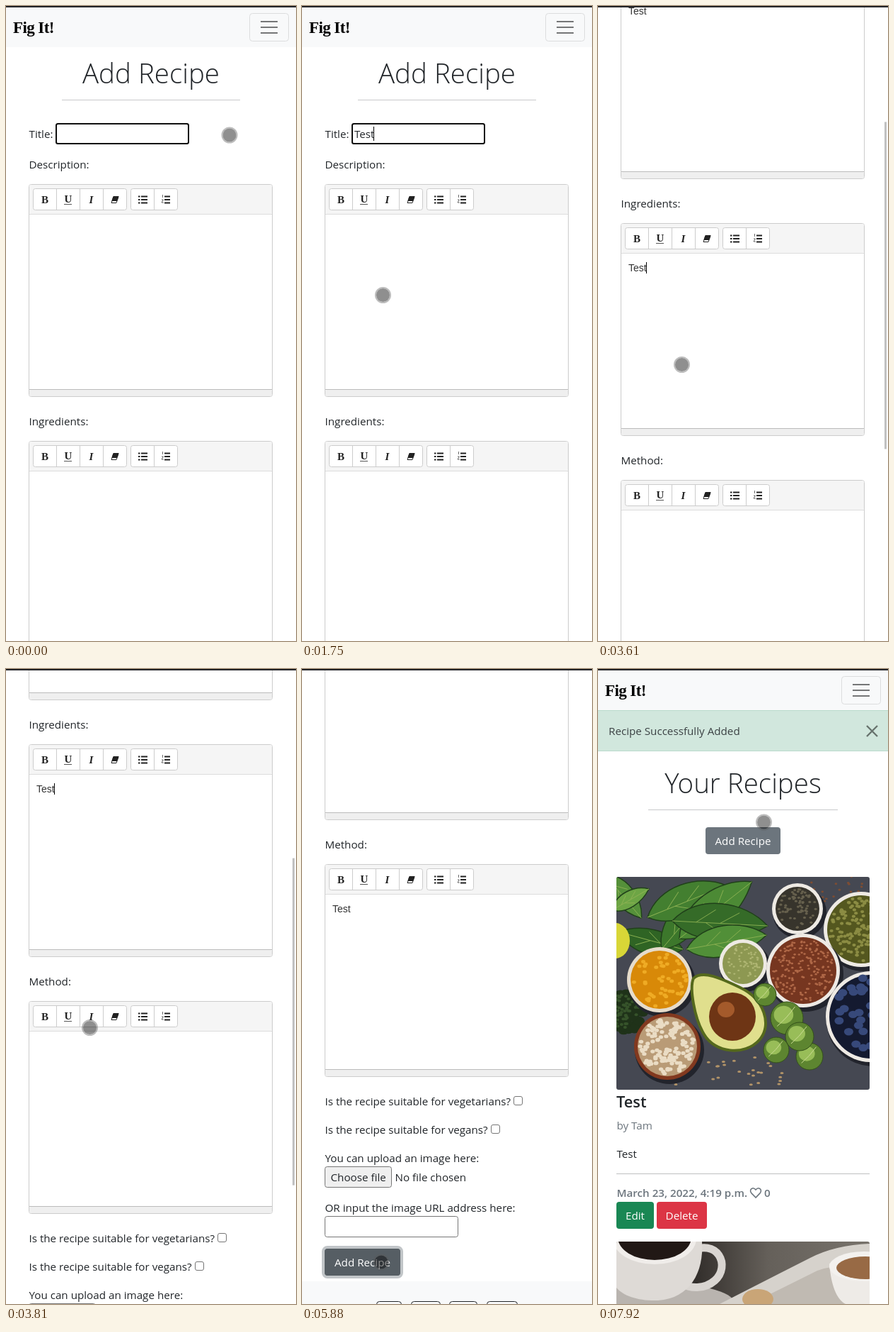
An HTML page for the animation above (7990 ms loop, 410x895 px).

```html
<!DOCTYPE html>
<html lang="en">
<head>
<meta charset="utf-8">
<title>Add Recipe</title>
<style>
html, body { margin: 0; height: 100%; overflow: hidden; background: #fff; }
svg { display: block; width: 100vw; height: 100vh; }
text { font: 15.2px "Open Sans", "Noto Sans", sans-serif; fill: #212529; }
.brand { font: bold 23px "Liberation Serif", serif; letter-spacing: -.6px; fill: #000; }
.h1 { font-size: 38.5px; font-weight: 300; text-anchor: middle; }
.h4 { font-size: 21.8px; font-weight: 600; }
.btn { text-anchor: middle; fill: #fff; }
.ed { font: 14px "Liberation Sans", Arial, sans-serif; fill: #333; }
.tool { font: bold 15px "Liberation Serif", serif; text-anchor: middle; fill: #222; }
.italic { font-style: italic; }
.muted { fill: #6c757d; }
.date { fill: #6c757d; font-weight: 600; }
</style>
</head>
<body>
<svg id="stage" viewBox="0 0 410 895" preserveAspectRatio="none"></svg>
<script>
const LOOP = 7990;
let seed = 7;
const rnd = () => (seed = seed * 16807 % 2147483647) / 2147483647;

const text = (x, y, s, cls = '') => `<text x="${x}" y="${y}" class="${cls}">${s}</text>`;
const rect = (x, y, w, h, fill, more = '') =>
  `<rect x="${x}" y="${y}" width="${w}" height="${h}" fill="${fill}" ${more}/>`;
const box = (x, y, w, h, stroke, fill = '#fff', r = 3) =>
  rect(x + .5, y + .5, w - 1, h - 1, fill, `rx="${r}" stroke="${stroke}"`);
const path = (d, stroke, w = 1, fill = 'none') =>
  `<path d="${d}" stroke="${stroke}" stroke-width="${w}" fill="${fill}"/>`;
const oval = (x, y, rx, ry, fill, more = '') =>
  `<ellipse cx="${x}" cy="${y}" rx="${rx}" ry="${ry}" fill="${fill}" ${more}/>`;

const navbar = () => rect(0, 0, 410, 58, '#f8f9fa') + text(10, 38, 'Fig It!', 'brand') +
  box(344, 10, 56, 40, '#dcddde', 'none', 4) + path('M360 22h24M360 30h24M360 38h24', '#757677', 2);

function editor(y) {
  const tools = box(38, 6, 133, 31, '#ccc') + box(176, 6, 67, 31, '#ccc') +
    path('M71.5 6v31M104.5 6v31M137.5 6v31M209.5 6v31', '#ccc') +
    text(55, 27, 'B', 'tool') + text(88, 26, 'U', 'tool') + path('M82 28.5h11', '#555') +
    text(120.5, 27, 'I', 'tool italic') +
    path('M149 26.5L152 17.5H159L156 26.5Z', '#222', 1) + path('M150 23.5L152 17.5H159L157 23.5Z', '#222', 1, '#222') +
    path('M187 17.5h2.5M187 22h2.5M187 26.5h2.5M191 17.5h9M191 22h9M191 26.5h9', '#222', 1.8) +
    path('M224 17.5h8M224 22h8M224 26.5h8', '#222', 1.8) + path('M221.5 15v4M220 22h2.5l-2.5 4h3', '#444', .8);
  return `<g transform="translate(0 ${y})">` + box(32, 0, 345, 300, '#ccc') +
    rect(33, 1, 343, 41, '#f5f5f5', 'rx="2"') + path('M33 42.5H376', '#ddd') +
    rect(33, 290, 343, 9, '#efefef', 'rx="2"') + path('M33 289.5H376', '#bbb') + tools + '</g>';
}

// Text fields: x, baseline, class, key press times, caret on, caret off
const fields = [
  [74, 186, '', [950, 1090, 1160, 1230], 560, 1880],
  [43, 319, 'ed', [1950, 2020, 2090, 2280], 1880, 3000],
  [43, 681, 'ed', [3070, 3140, 3350, 3410], 3000, 4220],
  [43, 1043, 'ed', [4360, 4430, 4820, 4820], 4220, 5020]
];

const form = navbar() + text(205, 108.5, 'Add Recipe', 'h1') + path('M79 132.5H331', '#c8c9ca') +
  text(32.5, 186, 'Title:') + box(70, 165, 189, 30, '#767676') +
  rect(71, 166, 187, 28, '#fff', 'id="focus" rx="2.5" stroke="#101010" stroke-width="2"') +
  ['Description:', 'Ingredients:', 'Method:'].map((s, i) => text(32.5, 229 + i * 362, s) + editor(251 + i * 362)).join('') +
  fields.map(([x, y, cls]) => text(x, y, '', cls + ' typed') + `<path class="caret" stroke="#000"/>`).join('') +
  '<g transform="translate(0 700)">' +
  text(32.5, 615, 'Is the recipe suitable for vegetarians?') + box(299, 602, 13, 13, '#767676', '#fff', 2.5) +
  text(32.5, 655, 'Is the recipe suitable for vegans?') + box(267, 642, 13, 13, '#767676', '#fff', 2.5) +
  text(32.5, 695, 'You can upload an image here:') + box(32, 701, 95, 30, '#767676', '#efefef') +
  text(40.5, 722, 'Choose file') + text(131.5, 722, 'No file chosen') +
  text(32.5, 765, 'OR input the image URL address here:') + box(32, 771, 189, 30, '#767676') +
  rect(0, 863, 410, 300, '#f8f9fa') +
  [[105, 36], [154, 42], [208, 40], [261, 44]].map(([x, w]) => box(x, 891, w, 38, '#212529', '#f8f9fa', 4)).join('') +
  rect(32, 817, 107, 38, '#6c757d', 'rx="4"') +
  '<g id="press">' + rect(30, 815, 111, 42, 'none', 'rx="6" stroke="#c1c5c8" stroke-width="4"') +
  rect(32, 817, 107, 38, '#565e64', 'rx="4"') + '</g>' + text(85.5, 842, 'Add Recipe', 'btn') + '</g>';

function specks(x, y, r, n, size, fill) {
  let s = '';
  while (n--) {
    const a = rnd() * 6.283, d = Math.sqrt(rnd()) * r;
    s += oval((x + d * Math.cos(a)).toFixed(1), (y + d * Math.sin(a)).toFixed(1), size, size * .8, fill);
  }
  return s;
}
const bowl = (x, y, r, rim, fill, dot, n, size = 2) => oval(x + 3, y + 5, r + 2, r + 1, '#22242c') +
  oval(x, y, r, r, rim) + oval(x, y, r - 5, r - 5, fill) + specks(x, y, r - 8, n, size, dot);
const leaf = (x, y, len, turn, fill) => `<g transform="translate(${x} ${y}) rotate(${turn})">` +
  path(`M0 0C${len * .25} ${-len * .3} ${len * .75} ${-len * .25} ${len} 0C${len * .7} ${len * .2} ${len * .25} ${len * .25} 0 0Z`, '#20401a', 1.5, fill) +
  path(`M0 0H${len}M${len * .25} 0l${len * .2} ${-len * .14}M${len * .5} 0l${len * .2} ${-len * .12}M${len * .35} 0l${len * .2} ${len * .12}`, '#8bb052', .9) + '</g>';

function seeds(n) {
  let s = '';
  while (n--) s += oval((110 + rnd() * 160).toFixed(1), (545 + rnd() * 44).toFixed(1), 2.5, 1.5, '#b39468');
  return s;
}

const food = rect(26, 293, 358, 300, '#454852') + seeds(28) + specks(335, 302, 40, 40, 1.8, '#7d4d33') +
  leaf(10, 290, 80, 50, '#55903a') + leaf(20, 340, 60, -30, '#6da545') +
  leaf(120, 395, 95, -165, '#2f6424') + leaf(90, 395, 110, -50, '#3c772b') + leaf(70, 350, 120, -22, '#437f30') +
  leaf(115, 380, 130, -38, '#4c8a35') + leaf(105, 355, 135, 3, '#356b28') + leaf(125, 395, 115, -10, '#518f38') +
  oval(24, 383, 21, 25, '#d8d637') + specks(36, 485, 28, 50, 8, '#1f3219') + specks(36, 482, 24, 60, 2.5, '#36532a') +
  bowl(282, 338, 36, '#eeeae4', '#37342c', '#66604d', 70) +
  bowl(372, 367, 53, '#eeeae4', '#54571f', '#8b8c43', 160, 2.6) +
  bowl(205, 415, 34, '#eeeae4', '#8d9852', '#afb673', 60, 1.5) +
  bowl(290, 425, 52, '#eeeae4', '#763620', '#b06847', 180, 1.7) +
  bowl(87, 438, 46, '#e6dccb', '#d88908', '#efab24', 50, 3) +
  bowl(98, 532, 47, '#82391f', '#b99b76', '#eadcc4', 130, 3.2) +
  bowl(386, 490, 64, '#eeeae4', '#141a30', '#37497a', 55, 6.5) +
  path('M135 436C148 424 174 436 201 449C235 465 247 502 228 523C207 546 165 541 150 515C136 492 129 449 135 436Z', '#55691c', 4, '#e0df8d') +
  oval(190, 490, 33, 34, '#6e3515') + oval(181, 480, 12, 11, '#a45a2b') +
  [[236, 459, 16], [267, 492, 23], [252, 537, 18], [299, 546, 19], [285, 518, 20]].map(([x, y, r]) =>
    oval(x, y, r, r, '#5d8530', 'stroke="#33501a"') + oval(x - r * .2, y - r * .2, r * .6, r * .55, '#98bd58') +
    path(`M${x - r * .6} ${y + r * .5}Q${x} ${y} ${x + r * .5} ${y - r * .7}`, '#cbdb93')).join('');

const coffee = rect(26, 807, 358, 88, 'url(#table)') +
  oval(80, 893, 112, 28, '#b9b4af') +
  path('M128 822C170 800 188 842 165 862C150 875 130 873 118 866', '#d9d5d1', 11) +
  path('M26 807H147C150 850 130 887 85 890C58 891 36 884 26 872Z', 'none', 0, '#dedad6') +
  oval(80, 803, 59, 36, '#f0edea') + oval(80, 801, 52, 32, '#211815') +
  path('M172 895L300 830Q335 812 384 810V895Z', 'none', 0, '#d6d2cc') +
  path('M215 895L310 848Q340 837 384 842V895Z', 'none', 0, '#c0bab2') +
  oval(226, 888, 22, 14, '#c9a577') +
  path('M327 838C330 875 340 890 350 895H384V828Z', 'none', 0, '#eeebe7') +
  oval(376, 842, 49, 21, '#f3f1ee') + oval(378, 844, 41, 16, '#986a45');

const button = (x, y, w, fill, label) => rect(x, y, w, 38, fill, 'rx="4"') +
  `<g class="dark">${box(x, y, w, 38, '#45433f', '#15191c', 4)}</g>` + text(x + w / 2, y + 25, label, 'btn');

const list = rect(0, 0, 410, 895, '#fff') + navbar() + rect(0, 58, 410, 58, '#badbcc') + rect(0, 59, 410, 56, '#d1e7dd') +
  `<g fill-opacity=".85">${text(15, 93, 'Recipe Successfully Added')}</g>` +
  path('M380 80L395 95M395 80L380 95', '#68736e', 2.4) +
  text(205, 174.5, 'Your Recipes', 'h1') + path('M71 198.5H339', '#c8c9ca') +
  button(152, 223, 106, '#6c757d', 'Add Recipe') +
  `<g clip-path="url(#pic1)">${food}</g>` +
  text(26, 618, 'Test', 'h4') + text(26.5, 649, 'by Tam', 'muted') + text(26.5, 689, 'Test') +
  path('M26 711.5H384', '#bfc0c1') + text(26.5, 744, 'March 23, 2022, 4:19 p.m.', 'date') +
  path('M223 745L216.8 738.6C213 734 219 729 223 734C227 729 233 734 229.2 738.6Z', '#6c757d', 1.6) +
  text(235, 744, '0', 'date') +
  button(26, 751, 53, '#198754', 'Edit') + button(83, 751, 71, '#dc3545', 'Delete') +
  `<g clip-path="url(#pic2)">${coffee}</g>`;

const stage = document.getElementById('stage');
stage.innerHTML = `<defs>
  <clipPath id="pic1">${rect(26, 293, 358, 300, '#000', 'rx="3"')}</clipPath>
  <clipPath id="pic2">${rect(26, 807, 358, 100, '#000', 'rx="3"')}</clipPath>
  <linearGradient id="table"><stop offset=".3" stop-color="#302c29"/><stop offset=".6" stop-color="#65605a"/><stop offset="1" stop-color="#78736c"/></linearGradient>
  </defs><g id="form">${form}</g><g id="list">${list}</g>` +
  rect(405, 0, 3, 461, '#c1c1c1', 'id="thumb"') +
  '<g id="cursor"><circle r="9.5" fill="#000" fill-opacity=".44"/>' +
  '<circle r="10.5" fill="none" stroke="#5a5a5a" stroke-opacity=".4" stroke-width="2"/></g>' +
  rect(0, 0, 410, 2, '#232427');

const $ = id => document.getElementById(id);
const typed = [...document.querySelectorAll('.typed')];
const carets = [...document.querySelectorAll('.caret')];
const darks = [...document.querySelectorAll('.dark')];
const show = (el, on) => el.setAttribute('visibility', on ? 'visible' : 'hidden');

// Linear track through [time, value...] keys
function track(keys, t) {
  const i = keys.findIndex(k => k[0] > t);
  if (i < 0) return keys[keys.length - 1].slice(1);
  if (!i) return keys[0].slice(1);
  const a = keys[i - 1], b = keys[i], p = (t - a[0]) / (b[0] - a[0]);
  return a.slice(1).map((v, j) => v + (b[j + 1] - v) * p);
}

const scrollKeys = [[2400, 0], [2750, 300], [3604, 300], [4004, 700]];
const barKeys = [[2399, 0], [2400, 1], [3350, 1], [3410, 0], [3603, 0], [3604, 1], [4430, 1], [4550, 0]];
const cursorKeys = [[130, 316, 182], [540, 176, 182], [1260, 176, 182], [1740, 114.5, 407.5], [2750, 114.5, 407.5],
  [3000, 118.5, 505.5], [4004, 118.5, 505.5], [4220, 115.5, 524.5], [5060, 115.5, 524.5], [5350, 120, 680],
  [5690, 112, 836], [6480, 112, 836], [6860, 168.5, 583], [6900, 168.5, 583], [7250, 130, 438],
  [7500, 72, 220], [7680, 130, 108], [7910, 234.5, 216]];
const cursorFade = [[6480, 1], [6550, .25], [6900, .25], [7000, 1]];

function draw(t) {
  const [scroll] = track(scrollKeys, t), onList = t >= 6480;
  show($('form'), !onList);
  show($('list'), onList);
  $('form').setAttribute('transform', `translate(0 ${-Math.round(scroll)})`);
  $('thumb').setAttribute('y', 5 + scroll * .516);
  $('thumb').setAttribute('opacity', track(barKeys, t));
  $('cursor').setAttribute('transform', `translate(${track(cursorKeys, t)})`);
  $('cursor').setAttribute('opacity', track(cursorFade, t));
  $('focus').setAttribute('opacity', t < 1880 ? 1 : 0);
  $('press').setAttribute('opacity', track([[5740, 0], [5870, 1]], t));
  darks.forEach(d => d.setAttribute('opacity', track([[6950, 1], [7150, 0]], t)));
  fields.forEach(([x, y, , keys, on, off], i) => {
    const s = 'Test'.slice(0, keys.filter(k => k <= t).length);
    if (typed[i].textContent !== s) typed[i].textContent = s;
    const end = Math.round(x + (s ? typed[i].getComputedTextLength() : 0)) - .5;
    carets[i].setAttribute('d', i ? `M${end} ${y - 13}v16` : `M${end} ${y - 16}v20`);
    carets[i].setAttribute('opacity', t >= on && t < off ? 1 : 0);
  });
}

const start = performance.now();
(function frame() {
  draw((performance.now() - start) % LOOP);
  requestAnimationFrame(frame);
})();
</script>
</body>
</html>
```
